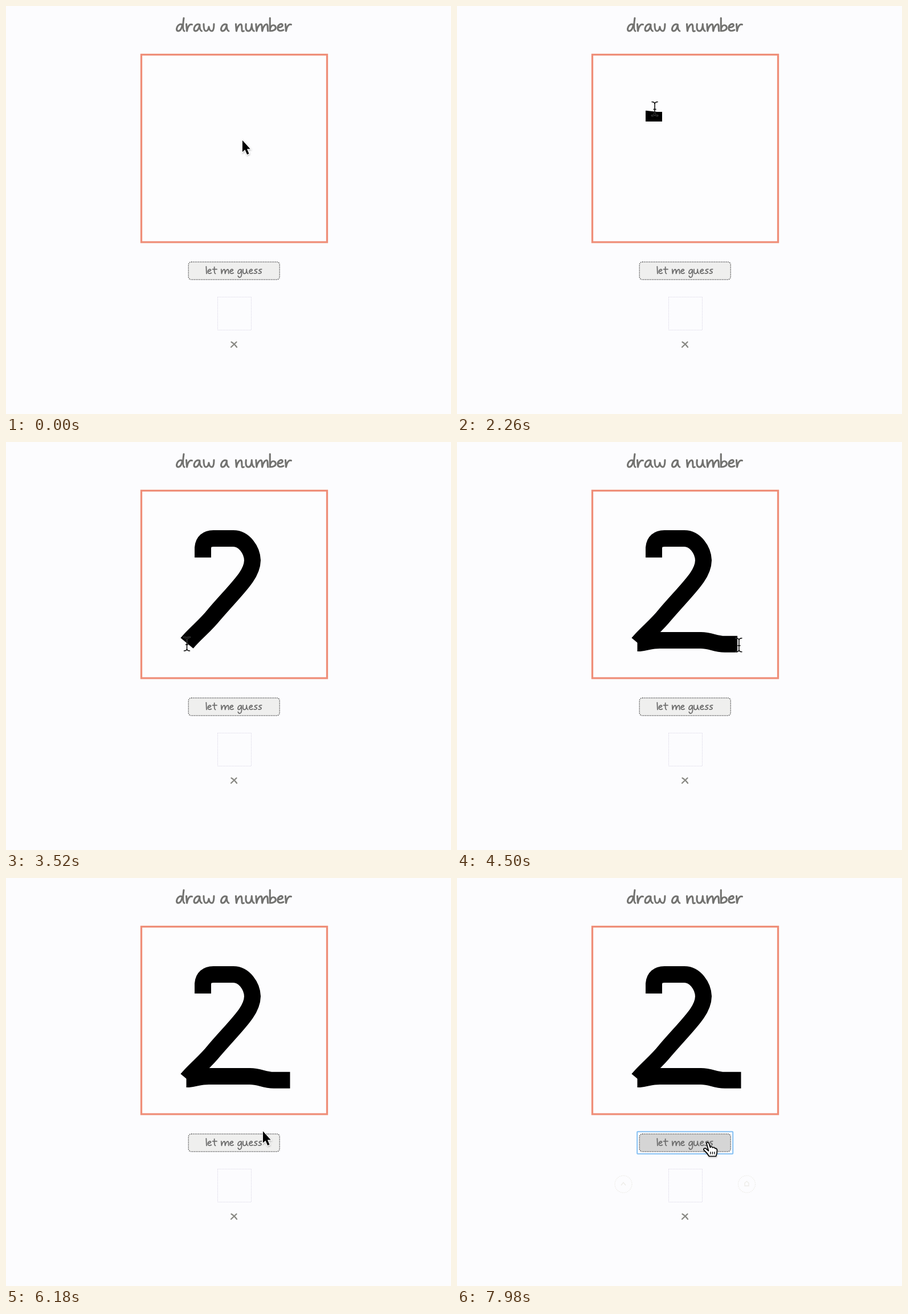
An HTML page for the animation above (8000 ms loop, 781x717 px).

```html
<!DOCTYPE html>
<html lang="en">
<head>
<meta charset="utf-8">
<title>draw a number</title>
<style>
html, body { margin: 0; width: 100%; height: 100%; overflow: hidden; background: #fcfcfe; }
svg { display: block; width: 781px; height: 717px; }
text { fill: transparent; text-anchor: middle; font-family: "Open Sans", sans-serif; }
.hand { fill: none; stroke-linecap: round; stroke-linejoin: round; }
.ink { fill: none; stroke: #000; stroke-width: 29; }
</style>
</head>
<body>
<svg viewBox="0 0 781 717">
  <defs>
    <filter id="shade" x="-50%" y="-50%" width="200%" height="200%">
      <feDropShadow dx="0.5" dy="1.5" stdDeviation="1.2" flood-color="#444" flood-opacity=".35"/>
    </filter>
    <path id="caret" d="M-5 -12Q0 -12 0 -8Q0 -12 5 -12M0 -8V8M-5 12Q0 12 0 8Q0 12 5 12M-2 1H2"/>
  </defs>
  <text x="400" y="45" font-size="29">draw a number</text>
  <g id="title" class="hand" stroke="#737371"></g>
  <rect x="237.5" y="85.5" width="326" height="329.5" fill="#fdfdfe" stroke="#ef8e78" stroke-width="3.3"/>
  <path id="top" class="ink" d="M345.5 203V186Q347 169.500 364 169.500H399C418 169.500 432 190 432.500 208C432 234 408 254 366 302.500C348 325 334 334 317.500 353.500"/>
  <path id="base" class="ink" d="M316.500 353.500H320C334 352 340 348.500 356 348.500H428C446 348.500 452 355.200 470 355.200H498.500"/>

  <rect id="button" x="320.25" y="449.75" width="160" height="31" rx="5" stroke="#555" stroke-width="1.5" stroke-dasharray="1.5 1.5"/>
  <rect id="ring" x="316.2" y="445.8" width="168" height="39" rx="1" fill="none" stroke="#85c0f3" stroke-width="2"/>
  <text x="400" y="471" font-size="16">let me guess</text>
  <g id="label" class="hand" stroke="#6c6c6c"></g>

  <rect x="371.5" y="511.5" width="59" height="58" fill="none" stroke="#dedbe9" stroke-dasharray="1.5 1"/>
  <g id="votes" fill="none" stroke="#8a8454" stroke-width="1.3">
    <circle cx="292" cy="538" r="15" stroke-dasharray="1.5 1.5"/>
    <circle cx="508.5" cy="538" r="15" stroke-dasharray="1.5 1.5"/>
    <path d="M288 540l4 -5l4 5M505 541v-5l3.5 -3l3.5 3v5z"/>
  </g>
  <text x="400" y="600" font-size="16">x</text>
  <path class="hand" d="M395.5 590.5Q400 593 405 599.5M404.5 590.5L395 599.5" stroke="#898984" stroke-width="2.3"/>

  <g id="arrow" filter="url(#shade)">
    <path d="M0 0V20.500L4.500 16.500L8.200 25L11.600 23.500L8 15.200H13.800Z" stroke="#fff" stroke-width="2.2" paint-order="stroke"/>
  </g>
  <g id="beam" class="hand">
    <use href="#caret" stroke="#fff" stroke-opacity=".4" stroke-width="2.6"/>
    <use href="#caret" stroke="#000" stroke-width="1.5"/>
  </g>
  <g id="pointer" filter="url(#shade)">
    <path d="M-2.500 2C-2.500 -.5 1 -.5 1.700 2L4 9C5 7 8 7.500 8.400 9.500C10 8 12 9 12.500 11C14.500 10 16 12 16 14Q16 20 14 24.500H2Q-1 19 -7 14C-9 11 -5 9 -3 11.500L1 15Z" fill="#fff" stroke="#000" stroke-width="1.7" stroke-linejoin="round"/>
    <path d="M4.500 16.500v4.500m3.500 0v-4.500m3.500 0v4.500" fill="none" stroke="#000" stroke-width="1.3"/>
  </g>
</svg>
<script>
const $ = id => document.getElementById(id);
const LOOP = 8000, PRESS = 2060, RELEASE = 5130, HOVER = 6260, CLICK = 7000;

// Letters share a few pen strokes; the baseline is at 0.
const stem = "M1 -13L2 0";
const arch = "c1 -8 7 -16 9 -11c1 4 0 8 1 11";
const bowl = "M11 -12C4 -16 -2 -1 4 0C8 0 11 -6 11.5 -12";
const tail = "Q11 -2 15 0";
const glyphs = {
  a: bowl + tail,
  d: bowl + "M14 -24" + tail,
  g: bowl + "Q14 9 8 11Q3 12 2 7",
  n: stem + arch + "q1 1 3 0",
  m: stem + arch + arch,
  r: stem + "c1 -8 5 -14 9 -12",
  u: "M1 -13c-1 8 0 13 4 13c4 0 6 -6 6 -13" + tail,
  w: "M1 -13q0 13 4 13t5 -8q1 8 5 8t4 -13",
  b: "M2 -24V0C2 -17 16 -11 11 -3Q7 1 2 -1",
  e: "M2 -7C7 -6 12 -9 10 -12C7 -15 1 -10 2 -4Q4 2 12 -2",
  l: "M1 -21L2 0",
  t: "M5 -20Q4 0 8 0M0 -13H12",
  s: "M10 -13C5 -14 1 -10 4 -8C12 -6 10 1 1 -1"
};

function letter(id, words, y, scale, pen) {
  const group = $(id);
  let x = 0;
  for (const c of words) {
    if (c === " ") { x += 9; continue; }
    const p = document.createElementNS("http://www.w3.org/2000/svg", "path");
    p.setAttribute("d", glyphs[c]);
    group.append(p);
    const box = p.getBBox();
    p.setAttribute("transform", `translate(${x - box.x} 0)`);
    x += box.width + 3.5;
  }
  group.setAttribute("stroke-width", pen / scale);
  group.setAttribute("transform", `translate(${400 - (x - 3.5) * scale / 2} ${y}) scale(${scale} ${scale * 0.95})`);
}
letter("title", "draw a number", 44, 1, 3.1);
letter("label", "let me guess", 470.3, 0.62, 1.8);

const span = (t, from, to) => Math.max(0, Math.min(1, (t - from) / (to - from)));
const easeIn = (u, power) => u ** power;
const easeOut = (u, power) => 1 - (1 - u) ** power;
const glide = (a, b, u) => a.map((v, i) => v + (b[i] - v) * u);

const topPart = t => easeIn(span(t, 2120, 3520), 1.27);
const basePart = t => easeOut(span(t, 3640, 4640), 1.7);

function reveal(id, part) {
  const length = $(id).getTotalLength();
  $(id).style.display = part > 0 ? "" : "none";
  $(id).setAttribute("stroke-dasharray", `${length * part} ${length + 1}`);
}

function along(id, part) {
  const p = $(id).getPointAtLength($(id).getTotalLength() * part);
  return [p.x, p.y + 1.5];
}

// The pointer runs slightly ahead of the ink.
function cursor(t) {
  if (t < PRESS) return ["arrow", glide([415, 236], [346, 201], easeOut(span(t, 0, 1940), 2))];
  if (t < RELEASE) {
    const ahead = t + 40;
    return ["beam", t < 3640 ? along("top", topPart(ahead)) : along("base", basePart(ahead))];
  }
  const pos = glide([499, 356], [440.5, 464.5], easeOut(span(t, 5200, 6740), 1.7));
  return [t < HOVER ? "arrow" : "pointer", pos];
}

function show(id, on) {
  $(id).style.display = on ? "" : "none";
}

function draw(t) {
  reveal("top", topPart(t));
  reveal("base", basePart(t));

  const [kind, pos] = cursor(t);
  for (const id of ["arrow", "beam", "pointer"]) show(id, id === kind);
  $(kind).setAttribute("transform", `translate(${pos})`);

  $("button").setAttribute("fill", t < HOVER ? "#efefee" : "#d5d5d5");
  show("ring", t >= CLICK);
  $("votes").style.opacity = span(t, CLICK, LOOP) * 0.13;
}

const start = performance.now();
function tick() {
  draw((performance.now() - start) % LOOP);
  requestAnimationFrame(tick);
}
tick();
</script>
</body>
</html>
```
